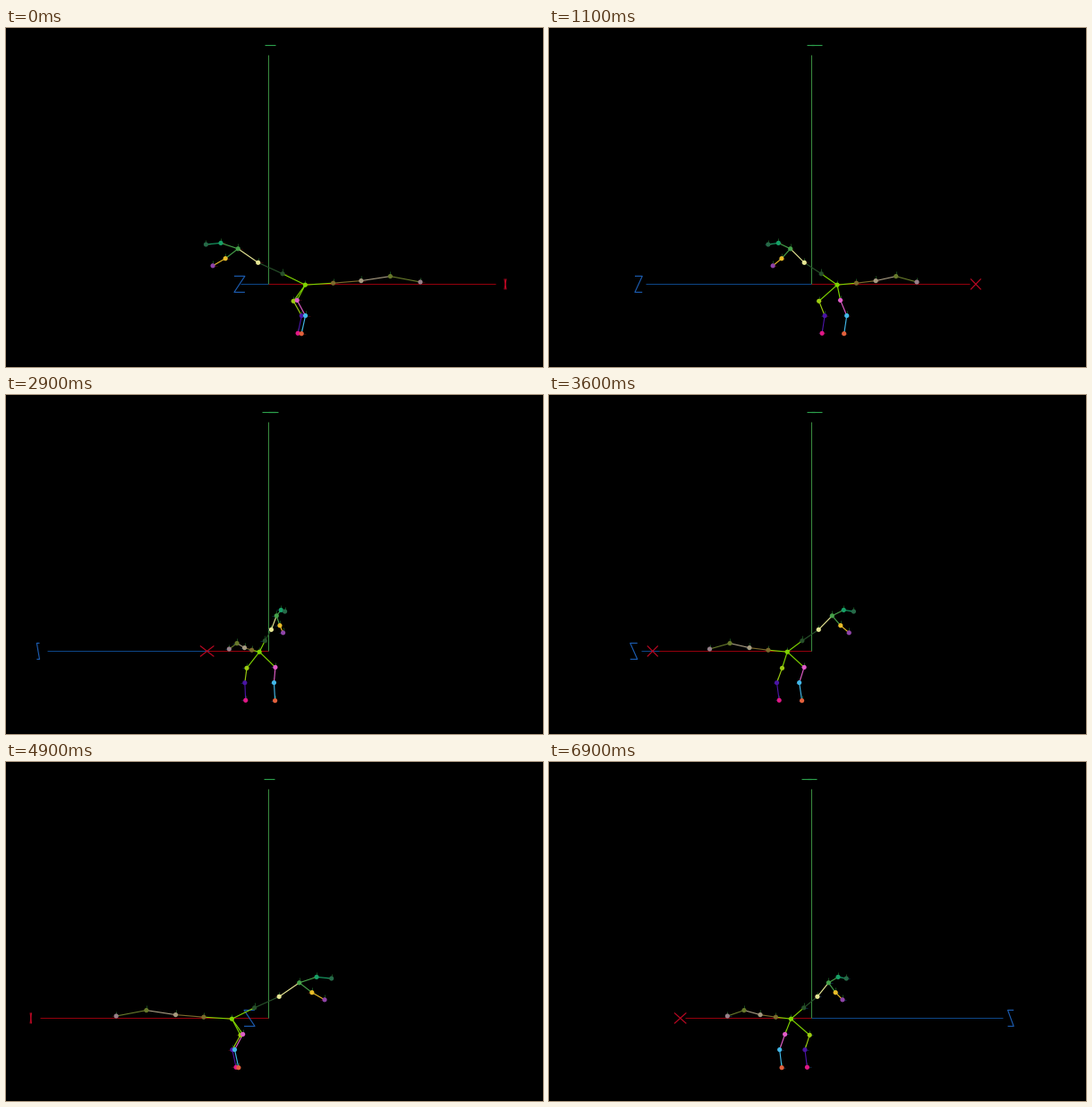
Recreate the animation shown at these times as a matplotlib script. Size 600x379 px, loop 7000 ms.

```python
import numpy as np
import matplotlib.pyplot as plt
from matplotlib.animation import FuncAnimation
from matplotlib.collections import LineCollection

W, H, DPI = 600, 379, 100
PX = 72 / DPI
CX, CY = 293.4, 286.4      # screen position of the world origin
AXIS, LABEL = 256, 266.5   # axis length and label distance
FRAMES, INTERVAL = 70, 100

# Turn of the model: angle in degrees at a few steps
STEPS = [0, 5, 9, 13, 17, 25, 29, 39, 46, 49, 51, 53, 55]
ANGLES = [7, 29.2, 46.5, 62.7, 79, 113.6, 131.8, 175.4, 206.2, 219.6,
          227.2, 232.8, 236.6]

# name: (parent, x, screen y, z, colour)
JOINTS = {
    "pelvis": (None, 41.2, 287.2, -0.4, "#7fd400"),
    "tail1": ("pelvis", 72.7, 285.2, 0, "#7d6a2c"),
    "tail2": ("tail1", 104.2, 282.6, 0, "#a69a80"),
    "tail3": ("tail2", 137, 277.6, 0, "#66782a"),
    "tail4": ("tail3", 170.8, 284, 0, "#97808a"),
    "spine1": ("pelvis", 15.8, 274.8, 0, "#27502a"),
    "spine2": ("spine1", -11.8, 262.3, 0, "#e6e694"),
    "neck": ("spine2", -34.4, 246.8, 0, "#46a04a"),
    "head": ("neck", -53.8, 240.4, 0, "#17a067"),
    "snout": ("head", -70.5, 242, 0, "#266a48"),
    "jaw": ("neck", -48.6, 257.7, 0, "#e8bc28"),
    "chin": ("jaw", -62.8, 265.8, 0, "#8f44a8"),
    "hip_l": ("pelvis", 30.1, 305.3, 17.2, "#9ccb10"),
    "knee_l": ("hip_l", 39.3, 321.7, 17, "#4a14a4"),
    "foot_l": ("knee_l", 35.1, 341.3, 17.2, "#e01886"),
    "hip_r": ("pelvis", 30.1, 304.4, -15.8, "#e05cc8"),
    "knee_r": ("hip_r", 39.4, 321.6, -16.8, "#42b8e8"),
    "foot_r": ("knee_r", 35, 341.7, -16.8, "#e2603c"),
}
NAMES = list(JOINTS)
POS = np.array([j[1:4] for j in JOINTS.values()])
COLORS = [j[4] for j in JOINTS.values()]
BONES = [(NAMES.index(j[0]), i) for i, j in enumerate(JOINTS.values()) if j[0]]

RED, GREEN, BLUE = "#94000c", "#3a8c40", "#0e4688"
RED_TEXT, GREEN_TEXT, BLUE_TEXT = "#c00824", "#2ca04c", "#1c5cb0"

# World-space strokes (x, height, z)
L = LABEL
AXES = [
    (BLUE, [(0, 0, 0), (0, 0, AXIS)]),
    (RED, [(0, 0, 0), (AXIS, 0, 0)]),
    (GREEN, [(0, 0, 0), (0, AXIS, 0)]),
]
LETTERS = [
    (BLUE_TEXT, [(-6, 9, L), (6, 9, L), (-6, -9, L), (6, -9, L)]),
    (RED_TEXT, [(L, 6, -8), (L, -6, 8)]),
    (RED_TEXT, [(L, 6, 8), (L, -6, -8)]),
    (GREEN_TEXT, [(-6, L + .5, -9.8), (0, L + .5, 0), (6, L + .5, -9.8)]),
    (GREEN_TEXT, [(0, L + .5, 0), (0, L + .5, 7.3)]),
]

fig = plt.figure(figsize=(W / DPI, H / DPI), dpi=DPI, facecolor="black")
ax = fig.add_axes([0, 0, 1, 1])
ax.set_xlim(0, W)
ax.set_ylim(H, 0)
ax.axis("off")


def add_lines(colors, width, order):
    lines = LineCollection([], colors=colors, linewidths=width * PX, zorder=order)
    return ax.add_collection(lines, autolim=False)


def project(points, cos, sin):
    x, y, z = np.array(points, float).T
    return np.column_stack([CX + x * cos - z * sin, CY - y])


axes_lines = add_lines([c for c, _ in AXES], 1, 1)
letters = add_lines([c for c, _ in LETTERS], 1.15, 1)
ticks = add_lines(["#300808", "#082038", "#174a1c"] * len(NAMES), 1, 2)
bones = add_lines([COLORS[a] for a, _ in BONES], 1.15, 3)
dots = ax.scatter(POS[:, 0], POS[:, 1], s=(5.2 * PX) ** 2, c=COLORS,
                  linewidths=0, zorder=4)


def draw(frame):
    # every fifth picture is held for one extra tick
    step = frame - (frame + 3) // 5
    turn = np.radians(np.interp(step, STEPS, ANGLES))
    cos, sin = np.cos(turn), np.sin(turn)

    axes_lines.set_segments([project(p, cos, sin) for _, p in AXES])
    letters.set_segments([project(p, cos, sin) for _, p in LETTERS])

    pts = np.column_stack([CX + POS[:, 0] * cos - POS[:, 2] * sin, POS[:, 1]])
    tips = [(5 * cos, 0), (-5 * sin, 0), (0, -5.5)]
    ticks.set_segments([[p, p + tip] for p in pts for tip in tips])
    bones.set_segments([pts[[a, b]] for a, b in BONES])
    dots.set_offsets(pts)
    return axes_lines, letters, ticks, bones, dots


anim = FuncAnimation(fig, draw, frames=FRAMES, interval=INTERVAL,
                     init_func=lambda: draw(0), repeat=True, repeat_delay=0)
plt.show()
```
